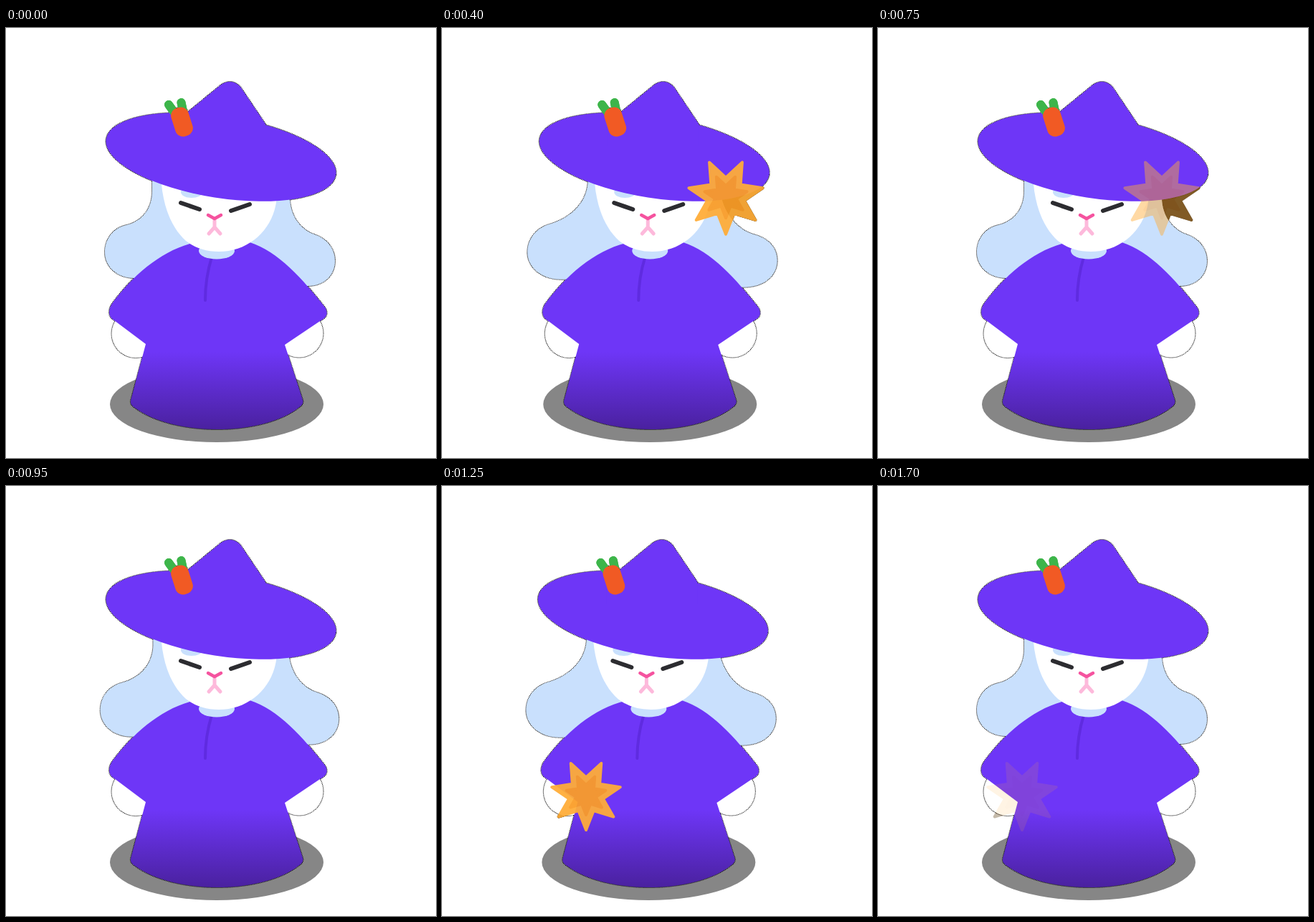
An HTML page that plays this animation: 600x600 px, repeating every 1750 ms.

```html
<!DOCTYPE html>
<html lang="en">
<head>
<meta charset="utf-8">
<title>Bunny wizard</title>
<style>
  html, body { margin: 0; width: 100%; height: 100%; overflow: hidden; background: #fff; }
  svg { display: block; width: 100%; height: 100%; }
  .round { fill: none; stroke-linecap: round; stroke-linejoin: round; }
</style>
</head>
<body>
<svg viewBox="0 0 600 600">
  <defs>
    <linearGradient id="robe" gradientUnits="userSpaceOnUse" x1="0" y1="452" x2="0" y2="560">
      <stop offset="0" stop-color="#6e36f7"/>
      <stop offset="1" stop-color="#4a219f"/>
    </linearGradient>
  </defs>

  <g id="backing"></g>

  <g id="figure">
    <ellipse cx="294" cy="525" rx="149" ry="53" fill="#868686"/>
    <!-- dotted rim around the silhouette -->
    <use href="#bunny" stroke="#000" stroke-width="2" stroke-dasharray="1 1"/>

    <g id="bunny">
      <path id="earL" fill="#c9e0fd"/>
      <path id="earR" fill="#c9e0fd"/>
      <circle cx="181" cy="426.500" r="33.500" fill="#fff"/>
      <circle cx="409" cy="426" r="33.500" fill="#fff"/>
      <path fill="url(#robe)" d="M265 299 C220 308 177 344 147 386 Q141 397 147 405 L195 441
        L174 520 Q173 526 180 530 C234 570 356 570 408 530 Q416 525 414 519
        L389 442 L444 405 Q450 400 446 391 C414 350 380 312 340 299 Z"/>
      <path class="round" d="M287 320 Q278 349 278 380" stroke="#5f2be0" stroke-width="4"/>
      <ellipse cx="294" cy="311" rx="25" ry="11.500" fill="#c9e0fd"/>
      <path fill="#fff" d="M217 200 V218 C220 250 231 279 251 297 Q270 312 297 312
        C342 312 377 277 378 232 V200 Z"/>
      <ellipse cx="259" cy="229" rx="15" ry="8" fill="#c9e0fd"/>
      <g class="round">
        <path d="M244 244 L270 253 M314 255 L340 246" stroke="#2c2c30" stroke-width="6"/>
        <path d="M291 268 V279 M283 287 L291 278 L299 287" stroke="#fdb9db" stroke-width="5"/>
        <path d="M282 261 L291 266 L300 261" stroke="#f5539f" stroke-width="4.500"/>
      </g>
      <g fill="#6e36f7">
        <ellipse rx="162.200" ry="57.200" transform="translate(300 180) rotate(8.900)"/>
        <path d="M235 135 L255 116 L299 80 Q314 69 327 82 L362 134 V165 H235 Z"/>
      </g>
      <path class="round" d="M227 107 L235 118 M244.500 104 L247 116" stroke="#3db54a" stroke-width="12"/>
      <rect x="-12.500" y="-20.500" width="25" height="41" rx="11" fill="#f15a24"
        transform="translate(245.500 131) rotate(-18)"/>
    </g>
  </g>

  <g id="stars"></g>
</svg>

<script>
const LOOP = 1750, FRAME = 50, BEAT = 850;
const $ = id => document.getElementById(id);
const ramp = (p, a, b) => Math.min(1, Math.max(0, (p - a) / (b - a)));
const smooth = u => u * u * (3 - 2 * u);

const hits = [
  { start: 0, x: 396, y: 235, radius: 55, shake: 4 },
  { start: BEAT, x: 201, y: 431, radius: 51, shake: 6 }
];

// Each ear has a resting and a spread outline with matching points.
const ears = {
  earL: [
    'M204 200 V228 C204 252 190 270 168 275 C150 279 138 294 138 313 C138 333 155 349 180 349 H260 V200 Z',
    'M208 200 V215 C205 240 186 262 153 273 C134 278 120 293 120 313 C120 334 140 351 167 351 H260 V200 Z'
  ],
  earR: [
    'M396 200 V236 C396 261 410 281 430 288 C448 294 459 308 459 325 C459 344 445 360 420 360 H300 V200 Z',
    'M393 200 V236 C399 257 414 280 440 288 C461 293 474 306 474 324 C474 346 455 362 425 362 H300 V200 Z'
  ]
};

function mixPaths([from, to], u) {
  const ends = to.match(/\d+/g);
  let i = 0;
  return from.replace(/\d+/g, n => +n + (ends[i++] - n) * u);
}

// Seven-pointed star with one tip straight down.
function starPoints(outer, inner) {
  return Array.from({ length: 14 }, (_, i) => {
    const a = Math.PI / 2 + i * Math.PI / 7, r = i % 2 ? inner : outer;
    return `${(r * Math.cos(a)).toFixed(2)},${(r * Math.sin(a)).toFixed(2)}`;
  }).join(' ');
}

function addStar(parent, radius, outerColor, innerColor) {
  const shape = (size, color) =>
    `<polygon points="${starPoints(size * radius, size * radius * 0.5)}" fill="${color}"
      stroke="${color}" stroke-width="4" stroke-linejoin="round"/>`;
  const group = document.createElementNS('http://www.w3.org/2000/svg', 'g');
  group.innerHTML = shape(0.96, outerColor) + shape(0.55, innerColor);
  return parent.appendChild(group);
}

for (const hit of hits) {
  hit.back = addStar($('backing'), hit.radius, '#000', '#000');
  hit.front = addStar($('stars'), hit.radius, '#ffad38', '#fb9e28');
}

function drawStar(hit, p) {
  const appear = ramp(p, 140, 285);
  const alpha = 0.94 * appear * (1 - ramp(p, 600, 890));
  const place = `translate(${hit.x} ${hit.y}) scale(${1.25 - 0.25 * appear})`;
  hit.front.setAttribute('transform', place);
  hit.back.setAttribute('transform', place);
  hit.front.setAttribute('opacity', alpha);
  hit.back.setAttribute('opacity', Math.min(1, 2 * alpha));
}

function render(time) {
  const t = Math.floor(time % LOOP / FRAME) * FRAME;
  for (const hit of hits) drawStar(hit, t - hit.start);

  const hit = hits[t < BEAT ? 0 : 1], p = t - hit.start;
  const spread = smooth(ramp(p, 0, 250)) * (1 - smooth(ramp(p, 300, 680)));
  for (const id in ears) $(id).setAttribute('d', mixPaths(ears[id], spread));

  // After the blow the figure jumps left and right on alternate steps.
  const shaking = p >= 300 && p <= 550;
  const side = p / FRAME % 2 ? 1 : -1;
  const shift = shaking ? side * hit.shake * (1 - 0.15 * ramp(p, 300, 550)) : 0;
  $('figure').setAttribute('transform', `translate(${shift} 0)`);
}

const begin = performance.now();
function tick() {
  render(performance.now() - begin);
  requestAnimationFrame(tick);
}
tick();
</script>
</body>
</html>
```
